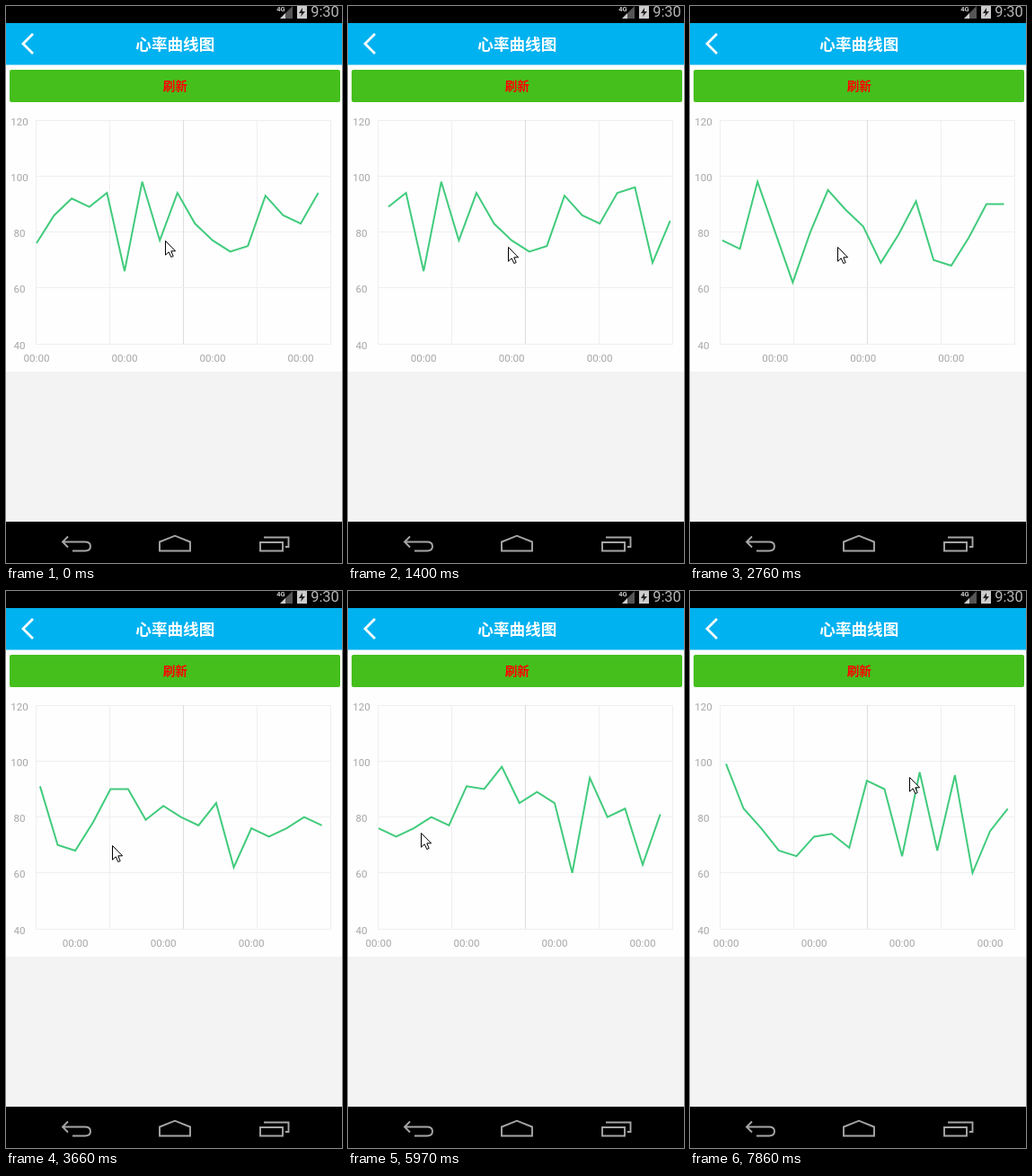
Animation, 374 px wide and 620 px high, one loop 8000 ms. Source, as an HTML page:

```html
<!DOCTYPE html>
<html lang="zh">
<head>
<meta charset="utf-8">
<style>
html, body { margin: 0; width: 100%; height: 100%; overflow: hidden; background: #000; }
svg { display: block; width: 374px; height: 620px; font-family: Roboto, sans-serif; }
text { text-anchor: middle; }
.cjk { font-family: "Noto Sans CJK SC", "Noto Sans CJK", sans-serif; font-weight: 700; }
.axis { font-size: 11.6px; fill: #a6a6a6; }
.icon { fill: none; stroke: #a6a6a6; stroke-width: 1.9; }
</style>
</head>
<body>
<svg viewBox="0 0 374 620">
  <rect width="374" height="620"/>
  <rect y="65" width="374" height="342" fill="#fefefe"/>
  <rect y="19" width="374" height="46.5" fill="#00b2f0"/>
  <rect y="407" width="374" height="167" fill="#f3f3f3"/>

  <text x="306" y="6" font-size="7.5" font-weight="700" fill="#ccc">4G</text>
  <path d="M305 14L319 0V14Z" fill="#555"/>
  <path d="M305 14L311 8V14Z" fill="#ccc"/>
  <path d="M324 0H335V14H324Z" fill="#ccc"/>
  <path d="M330 2L326 8H329L328 12L333 6H330Z" fill="#222"/>
  <text x="355" y="12" font-size="16.4" fill="#b8b8b8">9:30</text>

  <path d="M30 31L19 42L30 53" fill="none" stroke="#fff" stroke-width="2.8"/>
  <text class="cjk" x="188.3" y="48.7" font-size="17.6" fill="#fff">心率曲线图</text>
  <rect id="button" x="4" y="71" width="368" height="36" rx="2"/>
  <text class="cjk" x="188.3" y="94.2" font-size="13.6" fill="#f00">刷新</text>

  <g id="grid" class="axis"></g>
  <g id="labels" class="axis"></g>
  <polyline id="line" fill="none" stroke="#41cb7c" stroke-width="2"/>

  <path class="icon" d="M69 590.5L63 596.5L69 602.5M63 596.5H88Q94 596.5 94 601.5Q94 606.5 88 606.5H74"/>
  <path class="icon" d="M171 606.5V596.5L188 589.7L205 596.5V606.5Z"/>
  <path class="icon" d="M283 597H308V606.5H283ZM287 591.5H314.5V602H311"/>
  <path id="cursor" d="M.5 .5V16.2L4.2 12.8L6.8 18.5L9.2 17.5L6.8 11.8H11.6Z" fill="#fff" stroke="#000"/>
</svg>
<script>
const $ = id => document.getElementById(id);
const LOOP = 8000, TICK = 130; // the screen updates once per tick
const LEFT = 33.5, RIGHT = 361.5, STEP = 19.6;
const PRESS = 56, RELEASE = 58;

const rates = [
  76, 86, 92, 89, 94, 66, 98, 77, 94, 83, 77, 73, 75, 93, 86, 83, 94, 96, 69, 84, 75,
  81, 77, 74, 98, 80, 62, 80, 95, 88, 82, 69, 79, 91, 70, 68, 78, 90, 90, 79, 84,
  80, 77, 85, 62, 76, 73, 76, 80, 77, 91, 90, 98, 85, 89, 85, 60, 94, 80, 83, 63, 81];
const refreshed = [99, 83, 76, 68, 66, 73, 74, 69, 93, 90, 66, 96, 68, 95, 60, 75, 83];

// Moves in ticks: start, end, then the pose reached: readings scrolled, pointer x, y
const rest = [0, 177, 261];
const moves = [
  [1, 6, 0, 300, 262], [6, 10, 2.44, 178, 268], [10, 16, 14.5, 305, 266],
  [19, 21, 21.9, 164, 268], [21, 27, 23.7, 290, 282], [27, 28, 32.8, 118, 283],
  [28, 32, 33.44, 312, 249], [36, 41, 45, 85, 262], [43, 45, 45, 81, 269],
  [45, 49, 44.69, 81, 269], [52, 54, 44.69, 179, 95], [58, 60, 44.69, 244, 207]];

const clamp = u => Math.max(0, Math.min(1, u));
const easeOut = u => u * (2 - u);
const toY = rate => 376.1 - (rate - 40) * 3.1125;

function poseAt(tick) {
  return moves.reduce((pose, [start, end, ...goal]) => {
    const u = easeOut(clamp((tick - start) / (end - start)));
    return pose.map((v, i) => v + (goal[i] - v) * u);
  }, rest);
}

function drawGrid() {
  let out = "";
  for (let i = 0; i < 5; i++) {
    const x = LEFT + i * 82, y = Math.floor(127 + i * 62.25) + 0.5;
    out += `<path d="M33 ${y}H362" stroke="#efefef"/>
      <path d="M${x} 127V377" stroke="${i === 2 ? "#dedede" : "#efefef"}"/>
      <text x="15" y="${y + 5}">${120 - i * 20}</text>`;
  }
  $("grid").innerHTML = out;
}

function draw(tick) {
  const [scrolled, x, y] = poseAt(tick);
  const fresh = tick >= RELEASE, first = Math.ceil(scrolled);
  const points = [];
  let labels = "";
  for (let i = first; i < rates.length; i++) {
    const px = 34 + (i - scrolled) * STEP;
    if (px > RIGHT) break;
    const rate = fresh ? refreshed[i - first] : rates[i];
    points.push(px.toFixed(2) + "," + toY(rate).toFixed(2));
    if (i % 5 === 0 && px + 14 < RIGHT) labels += `<text x="${px.toFixed(2)}" y="395.6">00:00</text>`;
  }
  $("line").setAttribute("points", points.join(" "));
  $("labels").innerHTML = labels;
  $("button").setAttribute("fill", tick >= PRESS && !fresh ? "#3aa318" : "#45bf1c");
  $("cursor").setAttribute("transform", `translate(${Math.round(x)} ${Math.round(y)})`);
}

const begin = performance.now();
function frame() {
  draw(Math.floor((performance.now() - begin) % LOOP / TICK));
  requestAnimationFrame(frame);
}
drawGrid();
frame();
</script>
</body>
</html>
```
